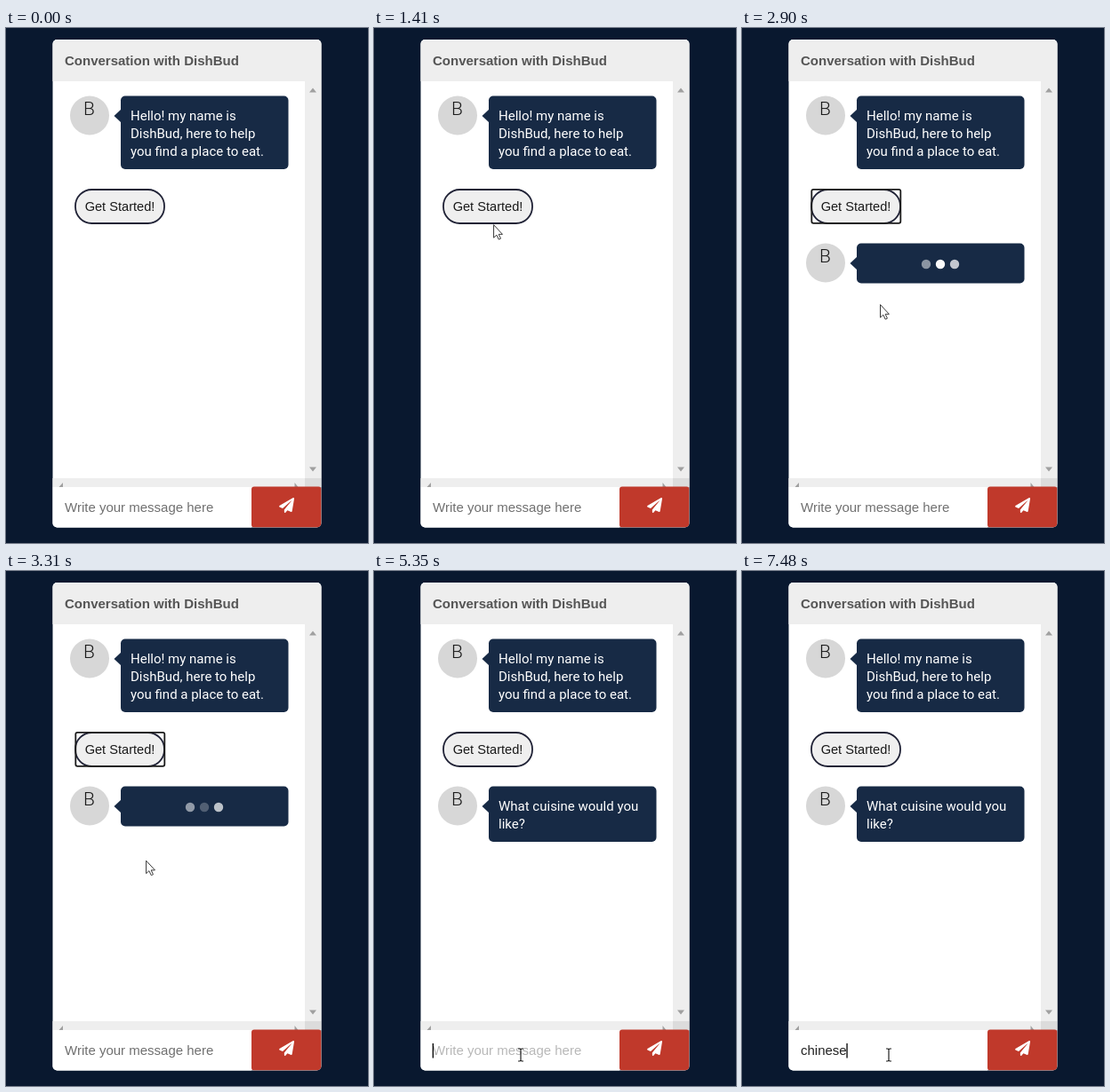
These frames come from a looping animation (407 px wide and 580 px high, 8 s). An HTML page:

```html
<!DOCTYPE html>
<html lang="en">
<head>
<meta charset="utf-8">
<title>Chat</title>
<style>
  html, body { margin: 0; width: 100%; height: 100%; overflow: hidden; background: #09182f; }
  svg { display: block; width: 100%; height: 100%; }
  text { font: 15px "Liberation Sans", Arial, sans-serif; white-space: pre; }
  .title { font-weight: bold; fill: #555; }
  .says { font-family: Roboto, "Open Sans", sans-serif; fill: #fff; }
  .letter { font: 300 21px Roboto, "Open Sans", sans-serif; fill: #1c1c1c; text-anchor: middle; }
  .label { font-size: 14.6px; fill: #1a1a1a; text-anchor: middle; }
  .pointer { fill: #fff; stroke: #3a3a3a; stroke-width: 1; stroke-linejoin: round; }
</style>
</head>
<body>
<svg viewBox="0 0 407 580">
  <defs>
    <clipPath id="panel"><rect x="52.5" y="13" width="302" height="549.5" rx="5"/></clipPath>
    <g id="bot">
      <circle cx="94" cy="22" r="22" fill="#d7d7d7"/>
      <text class="letter" x="93.5" y="21.5">B</text>
      <path d="M130 14.5V30.5L121.5 22.5Z" fill="#172a45"/>
    </g>
  </defs>
  <rect width="407" height="580" fill="#09182f"/>
  <g clip-path="url(#panel)">
    <rect x="52" y="13" width="303" height="550" fill="#fff"/>
    <rect x="52" y="13" width="303" height="47" fill="#eee"/>
    <path d="M336 60H355V507H336ZM52 507H336V517H52Z" fill="#eee"/>
    <rect x="336" y="507" width="19" height="10" fill="#dcdcdc"/>
    <path d="M341 72.5L345 67.5L349 72.5ZM341 494.5H349L345 499.5ZM64 512V517H59.5ZM324.5 512L328.5 517H324.5Z" fill="#a0a0a0"/>
    <rect x="52" y="517" width="224" height="46" fill="#fff"/>
    <rect x="276" y="516.5" width="78.5" height="46" rx="3" fill="#c0392b"/>
  </g>
  <text class="title" x="66" y="41.5">Conversation with DishBud</text>
  <path transform="translate(307 529) scale(.0333)" fill="#fff" d="M476 3L12 270Q-8 298 15 314L121 358L408 105Q425 100 417 113L176 407V488Q185 520 218 503L282 426L407 478Q435 482 440 460L512 28Q510-8 476 3Z"/>

  <use href="#bot" y="76.5"/>
  <rect x="129" y="76.5" width="188.5" height="82.5" rx="5" fill="#172a45"/>
  <text class="says" x="140" y="104">Hello! my name is</text>
  <text class="says" x="140" y="124">DishBud, here to help</text>
  <text class="says" x="140" y="144.3">you find a place to eat.</text>

  <rect x="78" y="182" width="100" height="38" rx="18.5" fill="#efefef" stroke="#202236" stroke-width="1.8"/>
  <rect id="ring" x="78.3" y="181.8" width="100" height="38" rx="2" fill="none" stroke="#1c1c1c" stroke-width="1.8"/>
  <text class="label" x="128" y="206">Get Started!</text>

  <g id="reply">
    <use href="#bot" y="242.5"/>
    <rect id="bubble" x="129" y="242.5" width="188.5" height="45" rx="5" fill="#172a45"/>
    <g id="dots" fill="#fff">
      <circle cx="207" cy="266" r="5.2"/>
      <circle cx="223" cy="266" r="5.2"/>
      <circle cx="239" cy="266" r="5.2"/>
    </g>
    <g id="question">
      <text class="says" x="140" y="270">What cuisine would you</text>
      <text class="says" x="140" y="290.3">like?</text>
    </g>
  </g>

  <text id="hint" x="66" y="545">Write your message here</text>
  <text id="typed" x="66" y="545" fill="#222"></text>
  <rect id="caret" y="532" width="1.3" height="16.5" fill="#000"/>

  <g id="pointer">
    <path id="arrow" class="pointer" d="M.5.5V15L3.8 12L6.2 17L8.4 16L6.1 11.2H10.4Z"/>
    <path id="hand" class="pointer" transform="translate(-7.7 -1)" d="M5 11V3Q5 1 6.7 1T8.4 3V8Q8.4 6.6 9.9 6.6T11.4 8.4Q11.4 7.1 12.8 7.1T14.2 8.9Q14.4 8 15.2 8T16.2 9.5V14.5Q16.2 17.5 14.4 19.5V21.5H6.8V19.5L1.6 13.2Q.4 11 2.1 10.7T5 13ZM8.4 8V12M11.4 8.4V12M14.2 8.9V12"/>
    <path id="beam" d="M-3-7H-1L0-6L1-7H3M0-6V6M-3 7H-1L0 6L1 7H3" fill="none" stroke="#222" stroke-width="1.2"/>
  </g>
</svg>
<script>
const LOOP = 8000;
const CLICK = 2100, TYPING = 2500, ANSWER = 3500, FOCUS = 4340;
const WORD = "chinese";
const KEY_TIMES = [6090, 6220, 6420, 7060, 7150, 7300, 7480];
const CARET_ON = [[FOCUS, 4840], [5350, 5910], [6090, 6970], [7060, LOOP]];

// time, x, y of the pointer's hot spot
const PATH = [
  [690, 334, 510], [750, 278, 464], [800, 248, 417], [850, 225, 366], [900, 205, 308],
  [1050, 170, 268], [1250, 146, 236], [1460, 133, 219], [1590, 133, 217], [2290, 133, 217],
  [2500, 137, 245], [2700, 149, 285], [2900, 155, 311], [3300, 157, 325], [3550, 160, 370],
  [3740, 162, 456], [3870, 163, 502], [4000, 164, 535], [4200, 165, 549], [4430, 165, 545]
];

const el = {};
document.querySelectorAll("[id]").forEach(node => el[node.id] = node);
const show = (node, on) => node.setAttribute("display", on ? "inline" : "none");
const clamp = v => Math.max(0, Math.min(1, v));

const slope = (i, axis) => {
  const a = PATH[i], b = PATH[i + 1];
  return a && b ? (b[axis] - a[axis]) / (b[0] - a[0]) : 0;
};

// Monotone tangent: flat at rests and turning points
function tangent(i, axis) {
  if (i === 0) return slope(0, axis);
  const a = slope(i - 1, axis), b = slope(i, axis);
  return a * b > 0 ? 2 * a * b / (a + b) : 0;
}

function pointerAt(t) {
  const last = PATH.length - 1;
  if (t >= PATH[last][0]) return PATH[last].slice(1);
  const i = PATH.findIndex((p, k) => k < last && t < PATH[k + 1][0]);
  const a = PATH[i], b = PATH[i + 1], span = b[0] - a[0];
  const u = clamp((t - a[0]) / span), v = 1 - u;
  return [1, 2].map(axis =>
    a[axis] * v * v * (1 + 2 * u) + b[axis] * u * u * (3 - 2 * u) +
    span * u * v * (v * tangent(i, axis) - u * tangent(i + 1, axis)));
}

function drawPointer(t) {
  const [x, y] = pointerAt(t);
  const onButton = y < 220, onInput = y > 517 && x < 276;
  show(el.pointer, t >= PATH[0][0]);
  show(el.hand, onButton);
  show(el.beam, onInput);
  show(el.arrow, !onButton && !onInput);
  el.pointer.setAttribute("transform", `translate(${x} ${y})`);
}

function drawReply(t) {
  const answered = t >= ANSWER;
  show(el.reply, t >= TYPING);
  show(el.dots, !answered);
  show(el.question, answered);
  el.bubble.setAttribute("height", answered ? 62.5 : 45);
  [...el.dots.children].forEach((dot, i) => {
    const phase = (t - 2900) / 1000 + .05 - (i - 1) * .25;
    dot.setAttribute("opacity", .62 + .38 * Math.cos(2 * Math.PI * phase));
  });
}

function drawInput(t) {
  const count = KEY_TIMES.filter(k => t >= k).length;
  const grey = Math.round(112 + 72 * clamp((t - FOCUS) / 90));
  show(el.hint, count === 0);
  el.hint.setAttribute("fill", `rgb(${grey},${grey},${grey})`);
  el.typed.textContent = WORD.slice(0, count);
  const width = count ? el.typed.getComputedTextLength() : 0;
  el.caret.setAttribute("x", 66 + width - .3);
  show(el.caret, CARET_ON.some(([from, to]) => t >= from && t < to));
}

function draw(t) {
  show(el.ring, t >= CLICK && t < FOCUS);
  drawReply(t);
  drawInput(t);
  drawPointer(t);
}

const start = performance.now();
function tick() {
  draw((performance.now() - start) % LOOP);
  requestAnimationFrame(tick);
}
tick();
</script>
</body>
</html>
```
